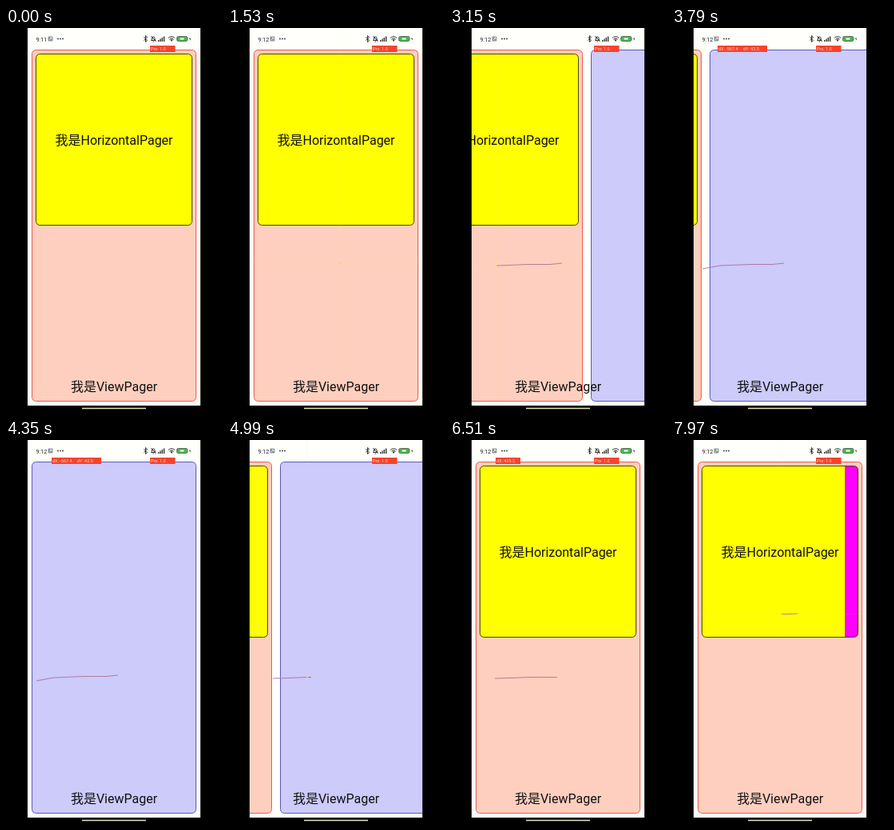
An HTML page for the animation above (7990 ms loop, 270x480 px).

```html
<!DOCTYPE html>
<html lang="zh">
<head>
<meta charset="utf-8">
<style>
  html, body { margin: 0; width: 100%; height: 100%; overflow: hidden; background: #000; }
  svg { display: block; width: 270px; height: 480px; }
  text { font-family: Roboto, "Noto Sans CJK SC", "Noto Sans CJK", sans-serif; }
  .title { font-size: 16px; text-anchor: middle; fill: #111; }
  .tag { font-size: 5.5px; fill: #ffd9cf; }
  .thin { fill: none; stroke: #333; stroke-width: 1; }
</style>
</head>
<body>
<svg viewBox="0 0 270 480">
  <defs>
    <clipPath id="screen"><rect x="27" y="0" width="216" height="472"/></clipPath>
    <clipPath id="inner"><rect x="37.5" y="32.5" width="195" height="214" rx="5"/></clipPath>
  </defs>
  <rect width="270" height="480"/>
  <g clip-path="url(#screen)">
    <rect x="27" width="216" height="472" fill="#fffffc"/>
    <g id="pages">
      <rect x="32.5" y="27.5" width="205" height="439" rx="5" fill="#fecfbe" stroke="#ec5a50"/>
      <g clip-path="url(#inner)">
        <g id="slides">
          <rect x="37" y="32" width="196" height="215" fill="#ff0"/>
          <rect x="233" y="32" width="196" height="215" fill="#f0f"/>
        </g>
      </g>
      <rect x="37.5" y="32.5" width="195" height="214" rx="5" fill="none" stroke="#4c4600"/>
      <text class="title" x="135" y="146">我是HorizontalPager</text>
      <rect x="248.5" y="27.5" width="205" height="439" rx="5" fill="#cccbfa" stroke="#5c58b8"/>
    </g>
    <text class="title" x="135" y="454">我是ViewPager</text>

    <text id="clock" x="37.5" y="16.5" font-size="7.2" fill="#222"></text>
    <rect x="52.5" y="10.5" width="6" height="6" rx="1" fill="#8c979c"/>
    <path d="M54 15l3-3m-2 0h2v2" fill="none" stroke="#fff" stroke-width=".7"/>
    <g fill="#333">
      <circle cx="65" cy="13.5" r=".9"/><circle cx="68" cy="13.5" r=".9"/><circle cx="71" cy="13.5" r=".9"/>
      <path d="M190 17v-2h1.4v2zm2.3 0v-3.5h1.4V17zm2.3 0v-5h1.4v5zm2.3 0v-6.5h1.4V17z"/>
      <path d="M207 17l-1.5-2a2.2 2.2 0 0 1 3 0z"/>
    </g>
    <path class="thin" d="M172.500 11.500l4 4-2 2v-8l2 2-4 4"/>
    <path class="thin" d="M181.500 15.500h5.500l-1-1.500v-2a2 2 0 0 0-3.500 0v2zm2 1.500h1.500M181.500 10l6 7"/>
    <path class="thin" d="M202.800 12.500a6 6 0 0 1 8.400 0M204.300 14.200a4 4 0 0 1 5.400 0"/>
    <rect x="213.500" y="10.500" width="13.500" height="6" rx="2" fill="#45b848" stroke="#566a56" stroke-width=".9"/>
    <path d="M217.500 13.500h5" stroke="#fff" stroke-width="2"/>
    <path d="M230.300 11l-1.300 3h1.200l-.5 2.500 1.500-3.200H230z" fill="#333"/>

    <rect x="180" y="22" width="31.500" height="8" fill="#f7432c"/>
    <text class="tag" x="181" y="27.800">Prs: 1.0</text>
    <g id="delta">
      <rect id="deltaBox" x="57" y="22" height="8" fill="#f7432c"/>
      <text class="tag" x="58" y="27.800" id="dx"></text>
      <text class="tag" x="89" y="27.800" id="dy"></text>
    </g>
    <g id="cross" stroke="#f0e890" stroke-width=".8" opacity=".15">
      <line id="crossX" y1="0" y2="472"/><line id="crossY" x1="27" x2="243"/>
    </g>
    <polyline id="trail" fill="none" stroke="#b0709c" stroke-width=".9"/>
    <line id="speed" stroke="#f05060"/>
    <circle id="tip" r="1" fill="#f2dc30"/>
  </g>
  <path d="M95 475.500h80" stroke="#e6e4bc" stroke-width="1.600"/>
</svg>
<script>
const LOOP = 7990, PAGE = 216, SLOP = 10, SETTLE = 600;
const $ = id => document.getElementById(id);
const set = (el, attrs) => { for (const k in attrs) el.setAttribute(k, attrs[k]); };

// steps: [ms, finger x]; path: points the finger passes, left or right
const drags = [
  { steps: [[1530, 140], [1660, 138], [2570, 85], [3583, 38]],
    path: [[140, 294], [125, 295.5], [98, 295.5], [85, 296], [60, 297], [38, 301]],
    from: 0, to: -PAGE, dx: 'dX: -567.4', dy: 'dY: 43.5', box: 62 },
  { steps: [[4370, 56], [4480, 58], [4990, 99], [5504, 134]],
    path: [[56, 298], [75, 297.5], [100, 296.5], [134, 296.5]],
    from: -PAGE, to: 0, dx: 'dX: 435.5', dy: '', box: 31 },
  { steps: [[7450, 157], [7550, 156], [7970, 137], [8100, 130]],
    path: [[157, 217], [147, 217.5], [130, 218]], inner: true }
];

function lerpAt(points, v) {
  for (let i = 1; i < points.length; i++) {
    const [a, p] = points[i - 1], [b, q] = points[i];
    const k = (v - a) / (b - a);
    if (k <= 1) return p + (q - p) * Math.max(0, k);
  }
  return points[points.length - 1][1];
}

const beyondSlop = (d, slop) => Math.sign(d) * Math.max(0, Math.abs(d) - slop);

function draw(t) {
  const drag = drags.filter(d => t >= d.steps[0][0]).pop();
  let page = 0, slide = 0, down = false, lifted = false;

  if (drag) {
    const { steps, path } = drag;
    const start = steps[0][1], end = steps[steps.length - 1];
    const x = lerpAt(steps, t), y = lerpAt(path, x);
    lifted = t >= end[0];
    down = !lifted;
    const move = beyondSlop(x - start, drag.inner ? 3 : SLOP);
    if (drag.inner) slide = move;
    else {
      page = drag.from + move;
      if (lifted) {
        const left = Math.max(0, 1 - (t - end[0]) / SETTLE);
        page = drag.to + (page - drag.to) * left ** 5;
      }
    }
    const dir = Math.sign(end[1] - start);
    const passed = path.filter(p => (x - p[0]) * dir > 0);
    set($('trail'), { points: [...passed, [x, y]].join(' ') });
    set($('tip'), { cx: x, cy: y });
    set($('speed'), { x1: x, y1: y, x2: x + dir * 5, y2: y });
    set($('crossX'), { x1: x, x2: x });
    set($('crossY'), { y1: y, y2: y });
    if (lifted) {
      set($('deltaBox'), { width: drag.box });
      $('dx').textContent = drag.dx;
      $('dy').textContent = drag.dy;
    }
  }

  const show = (id, on) => { $(id).style.display = on ? '' : 'none'; };
  show('trail', drag);
  show('cross', down);
  show('tip', down && !drag.inner);
  show('speed', down && drag === drags[1]);
  show('delta', lifted && t < 6900);
  set($('pages'), { transform: `translate(${Math.round(page)})` });
  set($('slides'), { transform: `translate(${Math.round(slide)})` });
  $('clock').textContent = t < 400 ? '9:11' : '9:12';
}

const began = performance.now();
function tick() {
  draw((performance.now() - began) % LOOP);
  requestAnimationFrame(tick);
}
tick();
</script>
</body>
</html>
```
